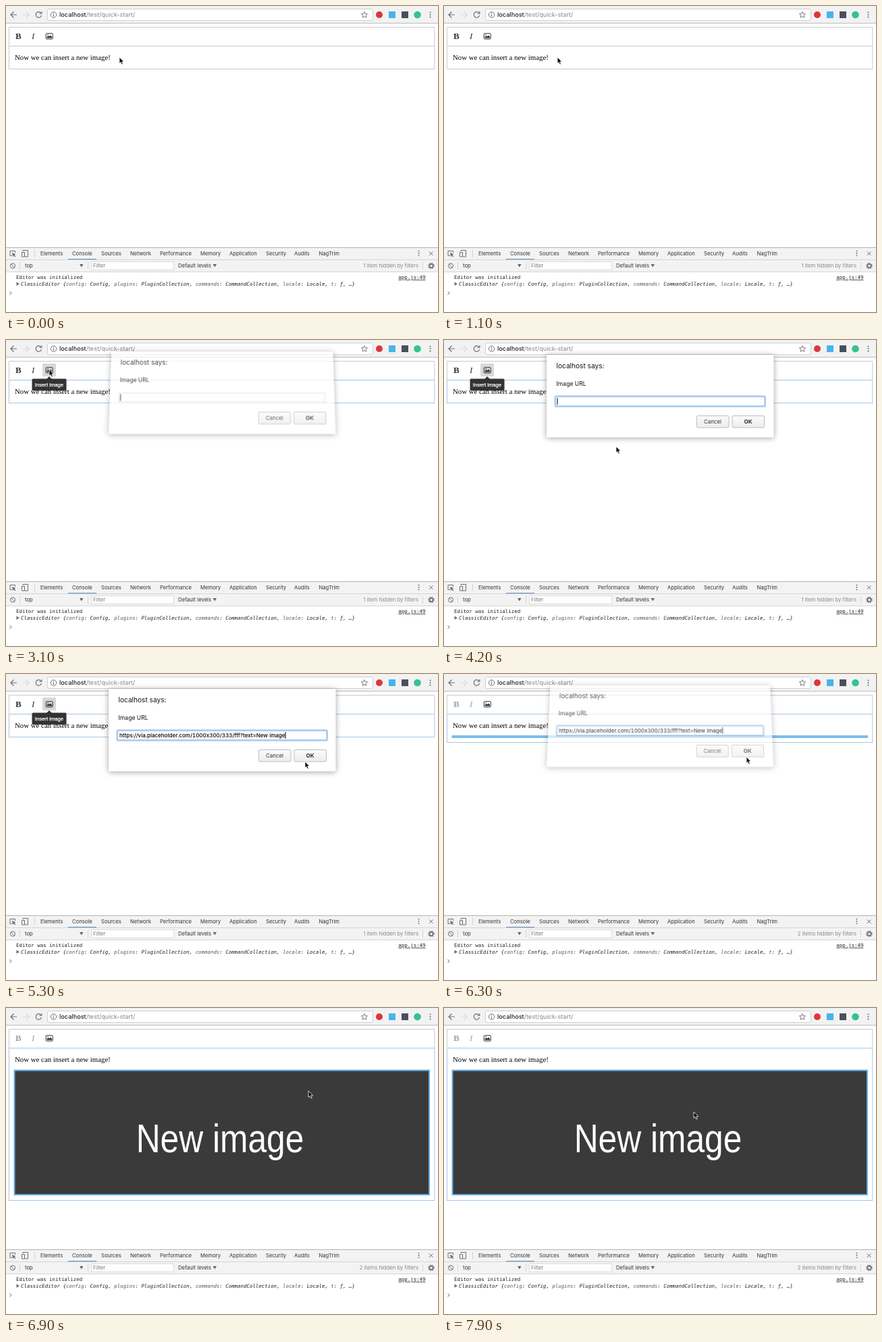
Animation, 640 px wide and 454 px high, one loop 8 s. Source, as an HTML page:

```html
<!DOCTYPE html>
<html lang="en">
<head>
<meta charset="utf-8">
<title>Inserting an image</title>
<style>
html, body { margin: 0; width: 100%; height: 100%; overflow: hidden; background: #fff; }
svg { position: absolute; left: 0; top: 0; width: 640px; height: 454px; }
text { font-family: Inter, sans-serif; font-size: 7.7px; fill: #333; white-space: pre; }
.serif { font-family: "Liberation Serif", serif; }
.sans { font-family: "Liberation Sans", sans-serif; }
.mono { font-family: "DejaVu Sans Mono", monospace; font-size: 7.42px; fill: #222; }
.mid { text-anchor: middle; }
.end { text-anchor: end; }
.soft { fill: #888; }
.key { fill: #585858; }
.line { fill: none; stroke: #6e6e6e; }
#dialog { transform-origin: 320px 144px; }
#sheet { filter: drop-shadow(0 1px 4px rgba(0, 0, 0, .38)); }
#url { font-size: 8.02px; font-weight: 500; font-variant-numeric: tabular-nums; fill: #000; }
</style>
</head>
<body>
<svg id="page" viewBox="0 0 640 454">
  <defs>
    <linearGradient id="face" x2="0" y2="1">
      <stop stop-color="#fbfbfb"/><stop offset="1" stop-color="#ececec"/>
    </linearGradient>
  </defs>

  <!-- Browser bar -->
  <path fill="#f2f2f2" d="M0 0h640v25H0z"/>
  <path class="line" style="stroke:#bcbcbc" d="M0 25.5h640"/>
  <rect x="61.5" y="4.5" width="482" height="17" rx="2.5" fill="#fff" stroke="#d0d0d0"/>
  <g class="line" stroke-width="1.2">
    <path d="M16 13H7m4.5-4.5L7 13l4.5 4.5"/>
    <path style="stroke:#dadada" d="M25 13h9m-4.5-4.5L34 13l-4.5 4.5"/>
    <path d="M51.5 10a4.2 4.2 0 1 0 1 4M52.8 8v3.200h-3.200"/>
    <circle cx="70.500" cy="13" r="4.200" stroke-width="1"/>
    <path d="M70.500 12.500v3M70.500 10.300v1.200"/>
    <path stroke-width=".9" d="M531 8.500l1.300 3 3.300.300-2.500 2.200.800 3.200-2.900-1.700-2.900 1.700.800-3.200-2.500-2.200 3.300-.300z"/>
  </g>
  <text x="79" y="16.300" style="font-size:9.150px;fill:#222"><tspan font-weight="500">localhost</tspan><tspan fill="#858585">/test/quick-start/</tspan></text>
  <circle cx="553" cy="13" r="5" fill="#e0353b"/>
  <path fill="#49b4ea" d="M567 8h10v10h-10z"/>
  <path fill="#4b4e5c" d="M586 8h10v10h-10z"/>
  <circle cx="609.500" cy="13" r="5.300" fill="#35c38d"/>
  <g fill="#666"><circle cx="628.500" cy="9.500" r="1"/><circle cx="628.500" cy="13" r="1"/><circle cx="628.500" cy="16.500" r="1"/></g>

  <!-- Editor -->
  <path class="line" style="stroke:#cacaca" d="M4.400 59V31.500h630.400V59"/>
  <rect id="frame" class="line" x="4.400" y="59.500" width="630.400"/>
  <rect id="hover" x="54" y="35" width="20" height="19" rx="1" fill="#d8d8d8"/>
  <g id="marks">
    <text class="serif" x="14" y="49" style="font-size:13px;font-weight:bold">B</text>
    <text class="serif" x="38" y="49" style="font-size:13px;font-style:italic">I</text>
  </g>
  <rect class="line" x="59.200" y="40.700" width="10" height="8.300" rx="1" style="stroke:#333"/>
  <path fill="#333" d="M60.500 47.500v-1.500l2-2 1.500 1.200 2-1.800 2.200 2.500v1.600z"/>
  <circle cx="62" cy="42.700" r=".8" fill="#333"/>
  <text class="serif" x="13" y="80" style="font-size:10.830px;fill:#000">Now we can insert a new image!</text>
  <path id="empty" fill="#7abdec" d="M11.500 91h616.500v4H11.500z"/>
  <g id="picture">
    <rect x="12.500" y="92.500" width="614.500" height="184.500" fill="#3a3a3a" stroke="#68b0e6" stroke-width="2"/>
    <text class="sans mid" transform="translate(317 214) scale(.85 1)" style="font-size:58.500px;fill:#fff">New image</text>
  </g>
  <g id="tooltip">
    <path fill="#333" d="M64 54l4 4h-8z"/>
    <rect x="38.500" y="57.500" width="51" height="17.500" rx="1.500" fill="#333"/>
    <text class="sans mid" x="64" y="69" stroke="#fff" stroke-width=".25" style="fill:#fff">Insert image</text>
  </g>

  <!-- Developer tools -->
  <path fill="#f3f3f3" d="M0 358h640v36H0z"/>
  <path class="line" style="stroke:#b4b4b4" d="M0 358.500h640"/>
  <path class="line" style="stroke:#d4d4d4" d="M0 376.500h640M0 394.500h640M42.500 362v11M20.500 380v11M121.500 380v11M617.500 380v11"/>
  <path fill="#7397c9" d="M92 375h42v1.300H92z"/>
  <g class="line">
    <path d="M9 370.500H6v-7h7.500V366"/>
    <path fill="#6e6e6e" stroke="none" d="M9 366l5.500 2.200-2.200 1 2 2-1 1-2-2-1 2z"/>
    <path d="M25 364v-1.500h7.500v9.500H28M23.500 365.500h4v6.500h-4z"/>
    <circle cx="10" cy="385.500" r="3.600"/><path d="M7.500 383l5 5"/>
    <path d="M627 364.500l5.500 5.500m0-5.500l-5.500 5.500"/>
    <circle cx="630" cy="385.500" r="2.700" stroke-width="1.700"/>
    <circle cx="630" cy="385.500" r="4.100" stroke-width="1.300" stroke-dasharray="1.610"/>
  </g>
  <g fill="#666"><circle cx="611.500" cy="363.700" r=".9"/><circle cx="611.500" cy="367" r=".9"/><circle cx="611.500" cy="370.300" r=".9"/></g>
  <g id="tabs"></g>
  <text x="28" y="388">top</text>
  <text x="255" y="388">Default levels</text>
  <path fill="#666" d="M109 383h5.500l-2.750 4.500zM306.500 383h5.500l-2.750 4.500z"/>
  <rect x="126.500" y="379.500" width="122" height="12" fill="#fff" stroke="#dcdcdc"/>
  <text x="129" y="388" style="fill:#777">Filter</text>
  <text id="hidden" class="soft end" x="611" y="388"></text>
  <text class="mono" x="15" y="405">Editor was initialized</text>
  <text class="mono end" x="621.500" y="405" text-decoration="underline">app.js:49</text>
  <path fill="#6e6e6e" d="M15.500 409.500l4.500 2.700-4.500 2.700z"/>
  <text class="mono" x="22" y="415" font-style="italic">ClassicEditor {<tspan class="key">config</tspan>: Config, <tspan class="key">plugins</tspan>: PluginCollection, <tspan class="key">commands</tspan>: CommandCollection, <tspan class="key">locale</tspan>: Locale, <tspan class="key">t</tspan>: ƒ, …}</text>
  <path class="line" d="M5.500 423.500l2.500 2.500-2.500 2.500"/>
</svg>

<svg id="dialog" viewBox="0 0 640 454">
  <path id="sheet" fill="#fff" d="M152 22h336.500v120.500q0 2-2 2H154q-2 0-2-2z"/>
  <text x="166.500" y="42.300" style="font-size:10.150px;fill:#111">localhost says:</text>
  <text x="166.500" y="68" style="font-size:8.600px;fill:#111">Image URL</text>
  <rect x="165.500" y="84.500" width="309" height="13" fill="#fff" stroke="#ddd"/>
  <rect id="ring" class="line" x="164.800" y="83.600" width="310.800" height="14.800" rx="1.500" stroke-width="2.800" style="stroke:#acccf0"/>
  <text id="url" x="168" y="94.300">https://via.placeholder.com/1000x300/333/fff?text=New image</text>
  <path id="caret" fill="#000" d="M0 86h1v10H0z"/>
  <g fill="url(#face)" stroke="#bdbdbd">
    <rect x="374.500" y="112.500" width="47.500" height="17.500" rx="1.500"/>
    <rect x="427" y="112.500" width="47.500" height="17.500" rx="1.500"/>
  </g>
  <text class="mid" x="398" y="124.300" style="font-size:7.950px">Cancel</text>
  <text class="mid" x="450.500" y="124.300" style="font-size:8.200px;font-weight:bold">OK</text>
</svg>

<svg viewBox="0 0 640 454">
  <path id="pointer" stroke="#fff" stroke-width=".8" d="M0 0v9.300l2.100-1.900 1.500 3.500 1.700-.700-1.500-3.400h2.900z"/>
</svg>

<script>
const LOOP = 8000, STEP = 100;
const OPEN = 2900, PASTE = 4300, CLOSE = 6300, LOADED = 6900;

// Pointer stops: time, x, y
const stops = [
  [0, 168, 76], [1400, 168, 76], [1600, 164, 72], [1900, 164, 72],
  [2200, 71, 48], [2400, 64, 44], [3200, 64, 44], [3700, 222, 138],
  [4200, 255, 158], [4600, 255, 158], [5300, 443, 130], [5500, 448, 123],
  [6900, 448, 123], [7700, 372, 156], [7900, 370, 154], [LOOP, 370, 154]
];
const tabs = {
  Elements: 51, Console: 98, Sources: 141, Network: 184, Performance: 228,
  Memory: 288, Application: 331, Security: 385, Audits: 427, NagTrim: 463.5
};

const $ = id => document.getElementById(id);
const clamp = v => Math.max(0, Math.min(1, v));
const fade = (id, v) => $(id).setAttribute("opacity", +v);
const smooth = k => k * k * (3 - 2 * k);

$("tabs").innerHTML = Object.entries(tabs)
  .map(([name, x]) => `<text x="${x}" y="369.8">${name}</text>`).join("");

function pointerAt(t) {
  const i = stops.findIndex(s => s[0] > t);
  const [t0, x0, y0] = stops[i - 1], [t1, x1, y1] = stops[i];
  const k = smooth((t - t0) / (t1 - t0));
  return [x0 + (x1 - x0) * k, y0 + (y1 - y0) * k];
}

function drawDialog(t) {
  const shown = t < CLOSE ? clamp((t - OPEN + 100) / 400) : clamp((CLOSE + 200 - t) / 300);
  const away = 1 - shown;
  const style = $("dialog").style;
  style.opacity = t < OPEN ? 0 : shown;
  style.transform = away
    ? `translateY(${-20 * away}px) perspective(1000px) rotateX(${46 * away}deg) scaleY(${1 + .18 * away})`
    : "none";

  const pasted = t >= PASTE;
  const blinkStart = pasted ? PASTE : OPEN + 200;
  fade("ring", t >= 3200);
  fade("url", pasted);
  fade("caret", Math.floor((t - blinkStart) / 500) % 2 === 0);
  const x = pasted ? 168 + $("url").getComputedTextLength() : 167.5;
  $("caret").setAttribute("transform", `translate(${x})`);
}

function draw(t) {
  const inserted = t >= CLOSE, loaded = t >= LOADED;
  $("frame").setAttribute("height", loaded ? 226 : inserted ? 42 : 34);
  $("frame").style.stroke = t < 1500 ? "#cacaca" : "#a8c6e6";
  fade("hover", t >= 2300 && !inserted);
  fade("tooltip", inserted ? 0 : clamp((t - 2300) / 300));
  fade("marks", inserted ? .45 : 1);
  fade("empty", inserted && !loaded);
  fade("picture", loaded);
  $("hidden").textContent = (inserted ? "2 items" : "1 item") + " hidden by filters";
  drawDialog(t);
  $("pointer").setAttribute("transform", `translate(${pointerAt(t)})`);
}

function tick() {
  draw(Math.floor(performance.now() % LOOP / STEP) * STEP);
  requestAnimationFrame(tick);
}
tick();
</script>
</body>
</html>
```
